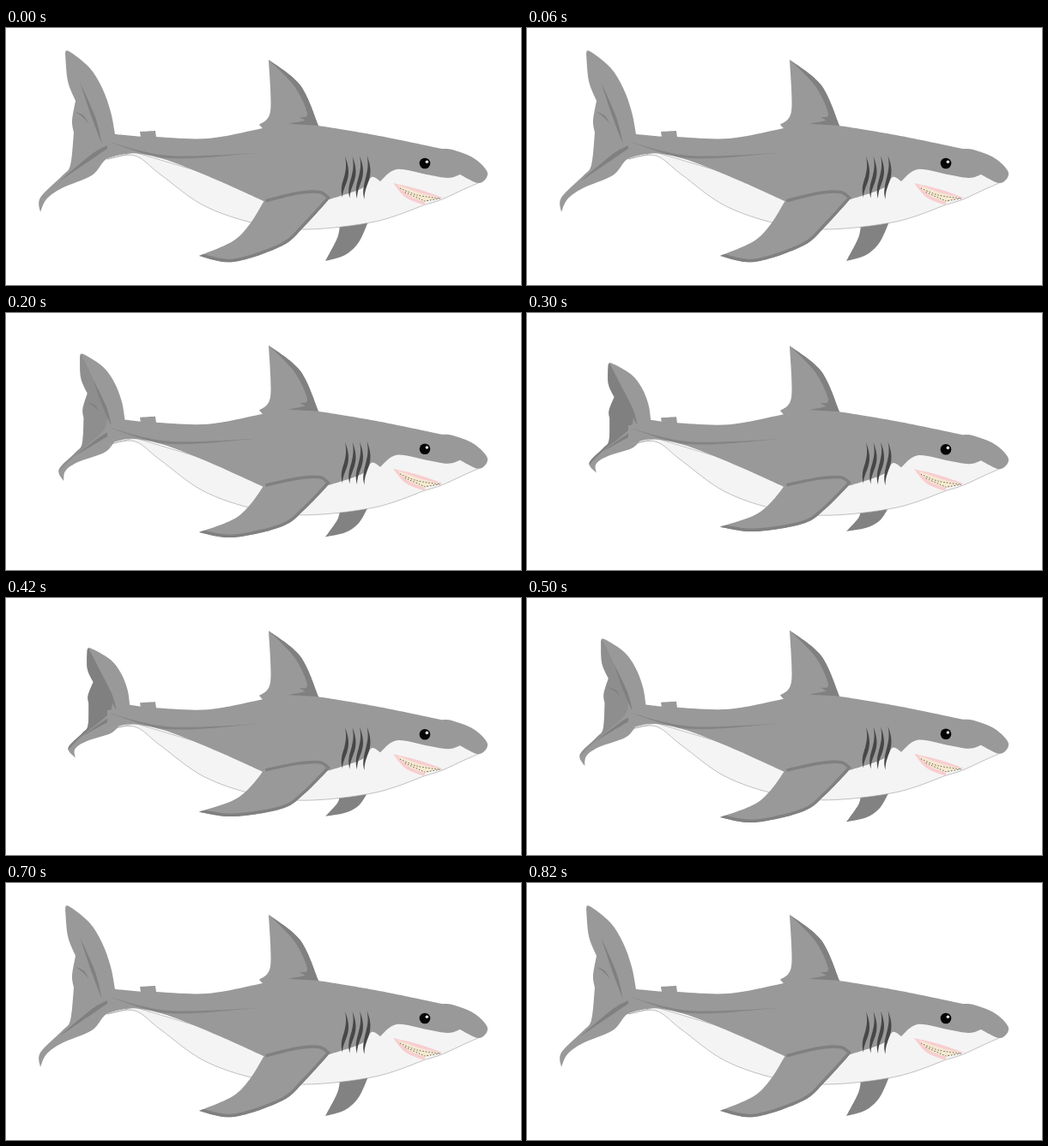
These frames come from a looping animation (600x300 px, 0.9 s). An HTML page:

```html
<!DOCTYPE html>
<html lang="en">
<head>
<meta charset="utf-8">
<title>Swimming shark</title>
<style>
  html, body { margin: 0; width: 100%; height: 100%; overflow: hidden; background: #fff; }
  svg { display: block; width: 100vw; height: 100vh; }
</style>
</head>
<body>
<svg viewBox="0 0 600 300">
  <defs>
    <clipPath id="tailClip"><path id="tailEdge"/></clipPath>
    <clipPath id="finClip"><path id="finEdge"/></clipPath>
  </defs>
  <path id="farFin" fill="#828282"/>
  <path id="tail" fill="#999"/>
  <g clip-path="url(#tailClip)" fill="#808080">
    <path id="tailShade"/>
    <path id="ribs"/>
  </g>
  <g id="body">
    <path id="belly" fill="#f4f4f4" stroke="#999" stroke-width=".6"/>
    <path id="back" fill="#999"/>
    <path id="dorsal" fill="#808080"/>
    <path id="flank" fill="#848484"/>
    <path id="gills" fill="#474747"/>
    <path id="mouth" fill="#f8cdd0"/>
    <path id="gum" fill="#f4e9d2"/>
    <path id="teeth" fill="none" stroke="#6d6248" stroke-dasharray="1.5 2"/>
    <circle cx="488" cy="158" r="6.3" fill="#050505"/>
    <circle cx="490.4" cy="156.2" r="1.8" fill="#ddd"/>
  </g>
  <path id="fin" fill="#999"/>
  <path id="finShade" fill="none" stroke="#808080" stroke-width="7" clip-path="url(#finClip)"/>
</svg>
<script>
const clamp = (v, lo, hi) => Math.max(lo, Math.min(hi, v));
const setPath = (id, d) => document.getElementById(id).setAttribute('d', d);

// Smooth curve through points; "|" marks a sharp corner.
function spline(text, warp = p => p) {
  let last = null, d = '';
  for (const part of text.split('|')) {
    const p = part.trim().split(/\s+/).map(s => warp(s.split(',').map(Number)));
    if (last) p.unshift(last);
    else d = 'M' + p[0];
    for (let i = 0; i < p.length - 1; i++) {
      const a = p[i], b = p[i + 1], before = p[i - 1] || a, after = p[i + 2] || b;
      const c1 = a.map((v, j) => v + (b[j] - before[j]) / 6);
      const c2 = b.map((v, j) => v - (after[j] - a[j]) / 6);
      d += `C${c1} ${c2} ${b}`;
    }
    last = p[p.length - 1];
  }
  return d;
}

// Thin crescent from a to b, bent through mid and w wide there.
function sliver(a, mid, b, w, warp) {
  const dx = b[0] - a[0], dy = b[1] - a[1], len = Math.hypot(dx, dy);
  const back = [mid[0] - w * dy / len, mid[1] + w * dx / len];
  return spline(`${a} ${mid} ${b} | ${back} ${a}`, warp);
}

const still = {
  belly: `118,153 150,149 180,171 230,207 290,228 350,235 430,226 489,206 |
    508,200 534,188 550,181 | 540,160 | 430,150 | 300,190 | 150,145 | 118,153`,
  back: `118,130 135,127 157,127 | 156,121 | 174,120 | 175,127 | 235,129 299,117 |
    295,113 | 308,97 306,37 | 343,67 364,114 | 430,125 508,141 |
    520,142 545,152 561,169 551,181 529,171 | 515,175 490,171 455,165 436,179 |
    426,174 415,187 377,200 | 300,202 | 247,178 211,163 180,152 146,146 118,152`,
  dorsal: '306,37 343,67 364,114 | 328,112 | 349,108 | 342,104 | 351,100 336,68 306,37',
  mouth: '451,181 480,188 509,198 | 488,202 | 488,207 | 466,198 451,181',
  gum: '456,183 484,193 506,198 | 488,203 | 470,196 456,183',
  teeth: '459,187 479,195 506,199 | 488,202 | 463,191'
};

const finTip = '300,203 284,229 264,249 225,266';
const finRim = '225,266 265,273 322,254 348,231 378,198 | 366,190 340,191 302,200';
const moving = {
  tail: `69,30 73,27 97,46 112,70 122,98 127,124 | 160,127 | 160,147 | 140,147 117,153
    100,172 65,187 47,200 40,215 | 40,198 65,173 75,160 79,122 | 77,108 81,85 |
    72,62 69,30`,
  tailShade: '69,24 86,63 104,108 106,131 | 97,146 62,179 40,200 | 20,220 | 10,20',
  fin: finTip + '|' + finRim,
  finShade: finRim,
  farFin: '389,230 386,245 372,272 | 395,265 411,250 422,226'
};

// k runs from 0, spread out, to 1, drawn in.
function swing(k) {
  const tail = ([x, y]) => {
    const dy = y - 126, free = k * clamp((157 - x) / 30, 0, 1);
    const push = 17 + (dy > 0 ? .003 * dy * dy : -.09 * dy);
    return [x + free * push, y - free * .32 * dy];
  };
  const lift = k ** 1.2;
  const fin = ([x, y]) => [x, y - lift * .23 * clamp((377 - x) / 90, 0, 1) * (y - 195)];
  const farFin = ([x, y]) => [x, y - lift * .43 * Math.max(0, y - 232)];
  return { tail, tailShade: tail, fin, finShade: fin, farFin };
}

function show(k) {
  const warps = swing(k);
  for (const id in moving) setPath(id, spline(moving[id], warps[id]));
  setPath('tailEdge', spline(moving.tail, warps.tail));
  setPath('finEdge', spline(moving.fin, warps.fin));
  setPath('ribs',
    sliver([86, 63], [104, 104], [112, 136], 4, warps.tail) +
    sliver([130, 133], [103, 145], [62, 179], -5, warps.tail) +
    sliver([81, 98], [90, 102], [97, 112], 2, warps.tail));
  document.getElementById('tailShade').setAttribute('opacity', k * k);
  document.getElementById('body').setAttribute('transform', `translate(0 ${1.2 * k})`);
}

for (const id in still) setPath(id, spline(still[id]));
setPath('flank', sliver([120, 133], [190, 149], [292, 146], 3));
setPath('gills', [0, 1, 2, 3].map(i => {
  const x = 395 + 8.5 * i, y = 150 - i / 3;
  return `M${x} ${y}c4 10 5 18 3 26c-2 8-6 14-6 ${22 + i}` +
    `c-3-10 0-18 2-${24 + i}c2-8 3-14 1-24z`;
}).join(''));

const step = 100, steps = 9, reach = 3;
let start = null, shown = -1;
function tick(now) {
  if (start === null) start = now;
  const i = Math.floor((now - start) / step) % steps;
  const pose = clamp(Math.min(i, 7 - i), 0, reach);
  if (pose !== shown) show((shown = pose) / reach);
  requestAnimationFrame(tick);
}
show(0);
requestAnimationFrame(tick);
</script>
</body>
</html>
```
